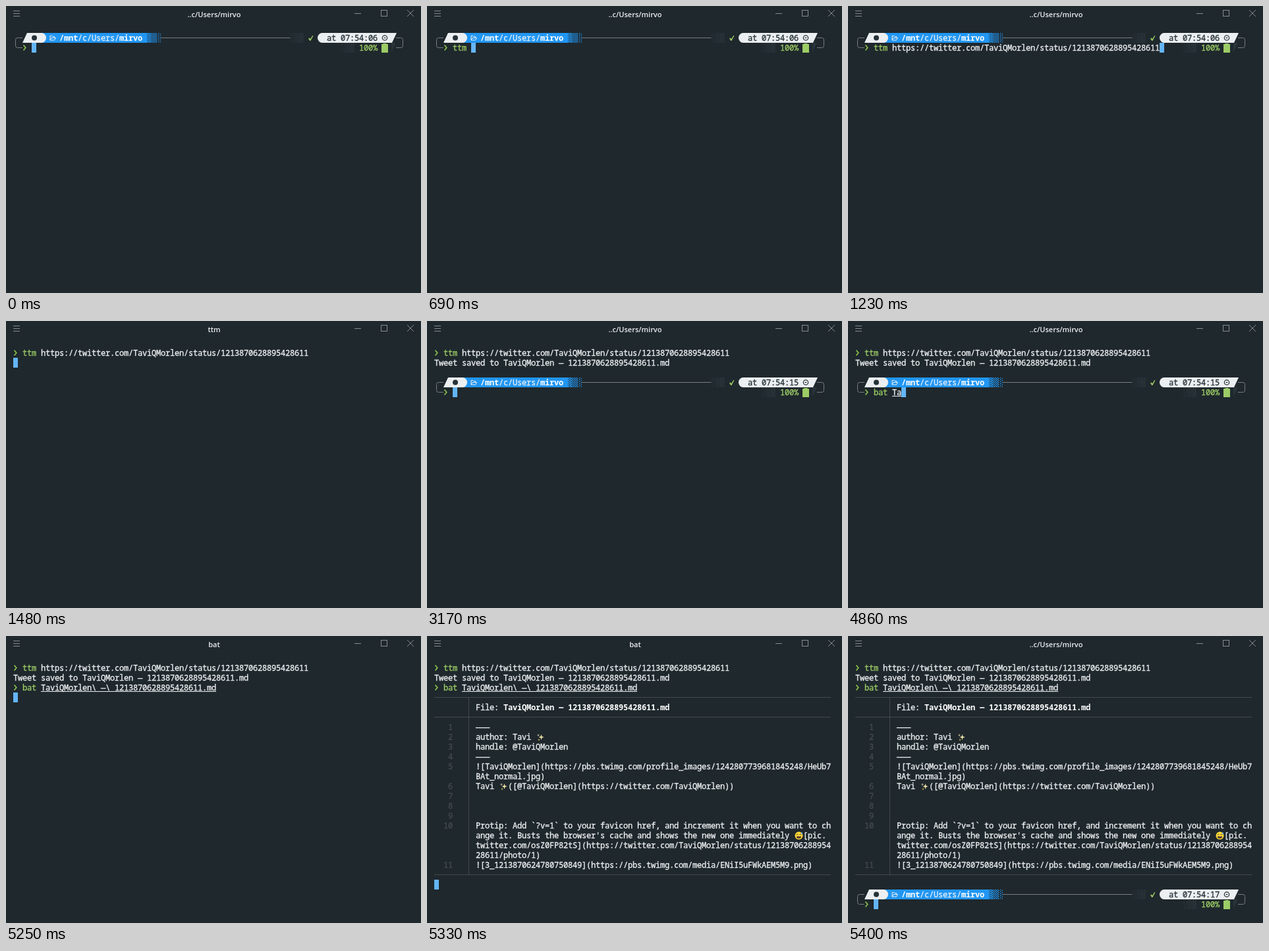
Write an HTML page that moves like this. It is 630 px wide and 437 px high and loops after 7.43 s.

```html
<!DOCTYPE html>
<html lang="en">
<head>
<meta charset="utf-8">
<title>Terminal</title>
<style>
  html, body { margin: 0; width: 100%; height: 100%; overflow: hidden; background: #1f282d; }
  svg { display: block; width: 630px; height: 437px; }
  text {
    white-space: pre; stroke-width: 0.35px;
    font: 500 12px "Noto Sans Mono", "DejaVu Sans Mono", monospace; letter-spacing: -0.2px;
  }
  .bold { font-weight: 700; stroke-width: 0; }
  .title { font: 600 11px "Open Sans", "Noto Sans", sans-serif; letter-spacing: 0; text-anchor: middle; }
</style>
</head>
<body>
<svg viewBox="0 0 630 437" xmlns="http://www.w3.org/2000/svg">
  <defs id="defs"></defs>
  <rect width="630" height="437" fill="#1f282d"/>
  <g fill="none" stroke="#878c8f">
    <path d="M11 7.5H21M11 11.5H21M11 15.5H21M529 11.5H539"/>
    <rect x="569.5" y="6.5" width="9" height="9"/>
    <path d="M609 6L619 16M619 6L609 16"/>
  </g>
  <text id="title" class="title" x="316" y="17" fill="#eceff1"></text>
  <g id="screen"></g>
</svg>
<script>
const LOOP = 7430;
const CELL = 7, LINE = 15, LEFT = 11, TOP = 41;
const GREEN = '#9ccc65', WHITE = '#eceff1', BLUE = '#2196f3', DARK = '#263238';
const GRAY = '#787d80', DIM = '#444a4d', SHADE = '#29343a';

const user = 'mirvo', name = 'Tavi', handle = 'TaviQMorlen';
const id = '1213870628895428611';
const site = 'https://twitter.com/';
const url = `${site}${handle}/status/${id}`;
const file = `${handle} — ${id}.md`;
const escaped = `${handle}\\ —\\ ${id}.md`;
const home = `..c/Users/${user}`;

const px = col => LEFT + col * CELL;
const py = row => TOP + row * LINE;

const text = (col, row, str, color = WHITE, cls = '') =>
  `<text x="${px(col)}" y="${py(row) + 12}" fill="${color}" stroke="${color}" class="${cls}">${str}</text>`;
const rect = (x, y, w, h, fill) =>
  `<rect x="${x}" y="${y}" width="${w}" height="${h}" fill="${fill}"/>`;
const path = (d, fill, stroke = 'none', width = 1) =>
  `<path d="${d}" fill="${fill}" stroke="${stroke}" stroke-width="${width}"/>`;
const line = (d, stroke, width) => path(d, 'none', stroke, width);

const cursor = (col, row) => rect(px(col), py(row), CELL, LINE, '#64b5f6');
const arrow = (col, row) => {
  const x = px(col), y = py(row);
  return line(`M${x + 1.5} ${y + 3.5}L${x + 4.8} ${y + 7.5}L${x + 1.5} ${y + 11.5}`, '#8bc34a', 1.7);
};
const underline = (col, row, length) =>
  rect(px(col), py(row) + 13, length * CELL, 1, WHITE);

// Three block shades, from dense to sparse
const dots = (color, level) => {
  const dot = (x, y) => rect(x, y, 1, 1, color);
  if (level === 0) return dot(1, 0) + dot(2, 0) + dot(3, 0) + dot(0, 1) + dot(1, 1) + dot(3, 1);
  if (level === 1) return dot(0, 0) + dot(2, 0) + dot(1, 1) + dot(3, 1);
  return dot(0, 0) + dot(2, 1);
};
const shadeDefs = (key, color) => [0, 1, 2].map(level =>
  `<pattern id="${key}${level}" width="4" height="2" patternUnits="userSpaceOnUse"
    patternTransform="scale(1.5)">${dots(color, level)}</pattern>`).join('');
const shades = (key, col, row, levels) => levels.map((level, i) =>
  rect(px(col + i), py(row), CELL, LINE, `url(#${key}${level})`)).join('');

document.getElementById('defs').innerHTML = shadeDefs('blue', BLUE) + shadeDefs('dim', SHADE);

function star(x, y, r, fill) {
  const k = r * 0.25;
  return path(`M${x} ${y - r}L${x + k} ${y - k}L${x + r} ${y}L${x + k} ${y + k}` +
    `L${x} ${y + r}L${x - k} ${y + k}L${x - r} ${y}L${x - k} ${y - k}Z`, fill);
}
function sparkles(col, row) {
  const x = px(col), y = py(row);
  return star(x + 8.5, y + 8, 4.3, '#f0e2a8') + star(x + 4, y + 5, 2, '#e8dcae') +
    star(x + 5, y + 12, 1.8, '#e8c95f');
}
function grin(col, row) {
  const x = px(col) + 7.5, y = py(row) + 8;
  return `<circle cx="${x}" cy="${y}" r="6" fill="#fdd835"/>` +
    line(`M${x - 3.7} ${y - 1}l1.4 -1.5l1.4 1.5M${x + 1} ${y - 1}l1.4 -1.5l1.4 1.5`, '#5d4037', 1) +
    path(`M${x - 3.7} ${y + 1}H${x + 3.7}A3.7 3.5 0 0 1 ${x - 3.7} ${y + 1}Z`, '#5d4037') +
    path(`M${x + 4.5} ${y - 5.5}q2.4 3.2 0 3.2q-2.4 0 0 -3.2Z`, '#64b5f6');
}

function prompt(row, clock) {
  const y = py(row), mid = y + 7.5, low = mid + LINE, bottom = y + LINE;
  return line(`M25 ${mid}H17.5Q14.5 ${mid} 14.5 ${mid + 3}V${low - 3}Q14.5 ${low} 17.5 ${low}H25`, GRAY) +
    line(`M592 ${mid}H599.5Q602.5 ${mid} 602.5 ${mid + 3}V${low - 3}Q602.5 ${low} 599.5 ${low}H592`, GRAY) +
    line(`M235 ${mid}H431.5`, GRAY) +
    // path segment
    rect(54, y, 160, LINE, BLUE) + shades('blue', 29, row, [0, 1, 2]) +
    path(`M25 ${bottom}L32 ${y}H54A7 7.5 0 0 1 54 ${bottom}Z`, WHITE) +
    `<circle cx="43" cy="${mid}" r="4" fill="${DARK}"/>` +
    line(`M67 ${y + 11}V${y + 4.5}H70L71 ${y + 5.5}H73.5V${y + 7.5}M67 ${y + 11}L69 ${y + 7.5}H75.5L73.5 ${y + 11}Z`, WHITE) +
    text(10, row, '/mnt', '#ffffff', 'bold') + text(14, row, '/c/Users/', '#e1edf5') +
    text(23, row, user, '#ffffff', 'bold') +
    // status and clock
    shades('dim', 60, row, [2, 1, 0]) +
    path(`M459 ${y + 8.5}L460.5 ${y + 7.5}L462 ${y + 9.3}L465.3 ${y + 4}L466.4 ${y + 4.5}L462.3 ${y + 12}H461.3Z`, GREEN) +
    path(`M480 ${y}H593L586 ${bottom}H480A7 7.5 0 0 1 480 ${y}Z`, WHITE) +
    text(68, row, 'at ' + clock, DARK) +
    `<circle cx="575" cy="${mid}" r="3.7" fill="none" stroke="${DARK}" stroke-width="1.2"/>` +
    line(`M573.5 ${mid}H576.5`, DARK, 1.2) +
    // second row
    arrow(2, row + 1) + shades('dim', 71, row + 1, [2, 1, 0]) +
    text(75, row + 1, '100%', GREEN) +
    rect(570, bottom + 2, 10, 13, GREEN) + rect(572.5, bottom + 1, 5, 1, GREEN) +
    path(`M585 ${bottom}H592L585 ${bottom + LINE}Z`, SHADE);
}

const command = (row, cmd, arg) =>
  arrow(0, row) + text(2, row, cmd, GREEN) + text(6, row, arg);

function listing() {
  const body = [
    [1, '———'],
    [2, `author: ${name} `],
    [3, `handle: @${handle}`],
    [4, '———'],
    [5, `![${handle}](https://pbs.twimg.com/profile_images/1242807739681845248/HeUb7`],
    ['', 'BAt_normal.jpg)'],
    [6, `${name}   ([@${handle}](${site}${handle}))`],
    [7, ''], [8, ''], [9, ''],
    [10, 'Protip: Add `?v=1` to your favicon href, and increment it when you want to ch'],
    ['', "ange it. Busts the browser's cache and shows the new one immediately   [pic."],
    ['', `twitter.com/osZ0FP82tS](${site}${handle}/status/${id.slice(0, 14)}`],
    ['', `${id.slice(14)}/photo/1)`],
    [11, '![3_1213870624780750849](https://pbs.twimg.com/media/ENiI5uFWkAEM5M9.png)']
  ];
  const rules = [3, 5, 21].map(row => `M11 ${py(row) + 7.5}H613`).join('');
  return line(`${rules}M63.5 ${py(3) + 7.5}V${py(21) + 7.5}`, DIM) +
    text(9, 4, 'File: ') + text(15, 4, file, '#ffffff', 'bold') +
    body.map(([num, str], i) =>
      text(2, i + 6, String(num).padStart(2), DIM) + text(9, i + 6, str)).join('') +
    sparkles(22, 7) + sparkles(14, 12) + grin(78, 17);
}

// Typed input: [time, characters shown]
const firstKeys = [[290, 1], [370, 2], [450, 3], [690, 4], [1150, 4 + url.length]];
const secondKeys = [[4010, 2], [4090, 3], [4260, 4], [4630, 5], [4860, 6], [5100, 5 + escaped.length]];
const typed = (keys, t) => keys.reduce((n, [at, count]) => t >= at ? count : n, 0);

function input(row, cmd, arg, count, underlined) {
  const shown = arg.slice(0, Math.max(0, count - 4));
  return text(4, row, cmd.slice(0, count), GREEN) + text(8, row, shown) +
    (underlined ? underline(8, row, shown.trimEnd().length) : '') + cursor(4 + count, row);
}

function scene(t) {
  if (t < 1480)
    return [home, prompt(0, '07:54:06') + input(1, 'ttm', url, typed(firstKeys, t), false)];

  let out = command(0, 'ttm', url);
  if (t < 3170) return ['ttm', out + cursor(0, 1)];

  out += text(0, 1, `Tweet saved to ${file}`);
  if (t < 5250)
    return [home, out + prompt(3, '07:54:15') + input(4, 'bat', escaped + ' ', typed(secondKeys, t), true)];

  out += command(2, 'bat', escaped) + underline(6, 2, escaped.length);
  if (t < 5330) return ['bat', out + cursor(0, 3)];

  out += listing();
  if (t < 5400) return ['bat', out + cursor(0, 22)];
  return [home, out + prompt(23, '07:54:17') + cursor(4, 24)];
}

const titleNode = document.getElementById('title');
const screenNode = document.getElementById('screen');
const start = performance.now();
let last = '';

function draw() {
  const [title, markup] = scene((performance.now() - start) % LOOP);
  if (title + markup !== last) {
    last = title + markup;
    titleNode.textContent = title;
    screenNode.innerHTML = markup;
  }
  requestAnimationFrame(draw);
}
draw();
</script>
</body>
</html>
```
